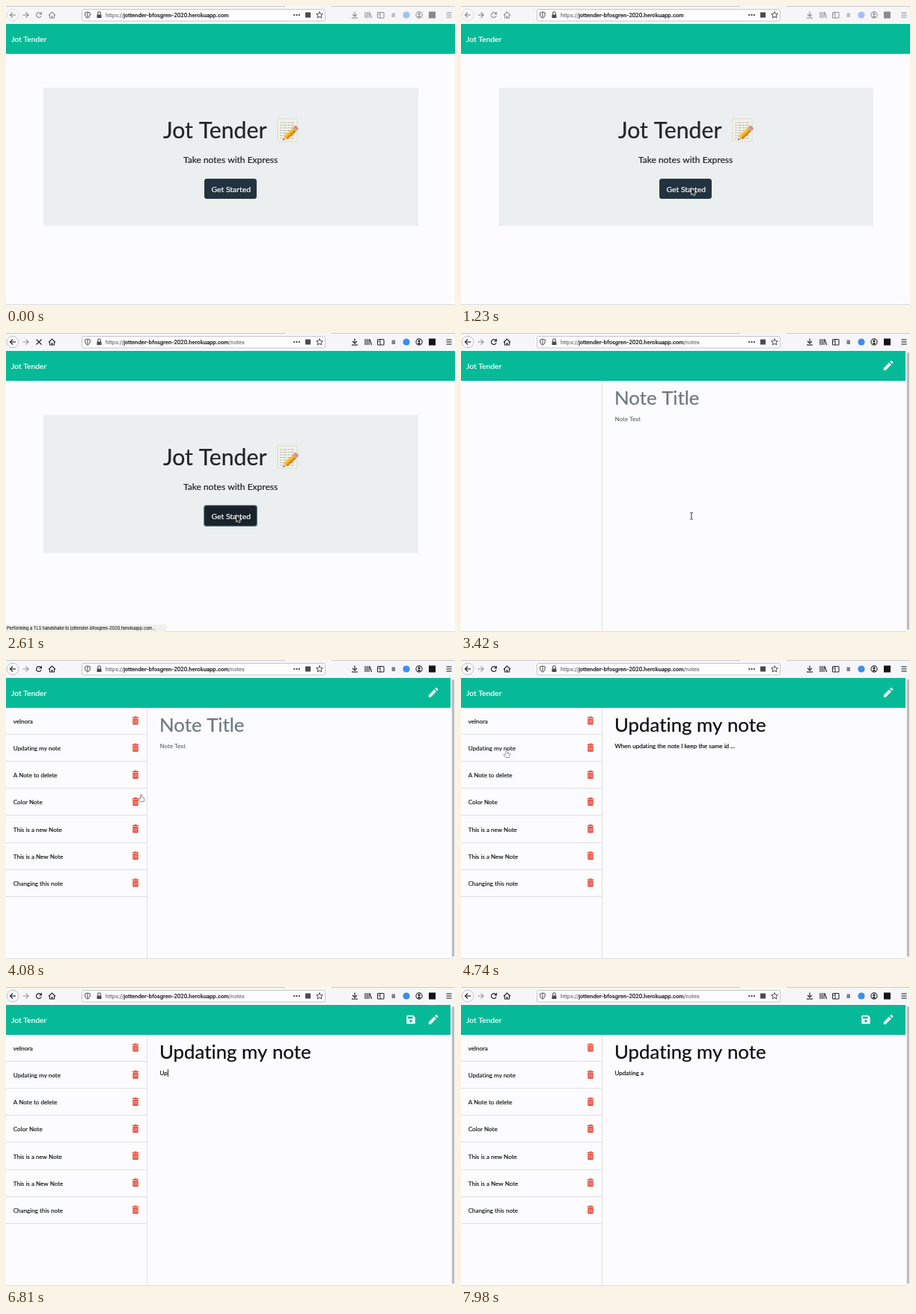
Animation of 600x400 px, one loop 8000 ms. Source, as an HTML page with a canvas:

```html
<!DOCTYPE html>
<html lang="en">
<head>
<meta charset="utf-8">
<title>Notes demo</title>
<style>
html, body { margin: 0; width: 100%; height: 100%; overflow: hidden; background: #fcfcfe; }
canvas { display: block; width: 600px; height: 400px; }
</style>
</head>
<body>
<canvas id="stage" width="600" height="400"></canvas>
<script>
const ctx = document.getElementById('stage').getContext('2d');
const LOOP = 8000;
const T = { active: 2250, click: 2400, status: 2450, notes: 3100, list: 3750,
  open: 4450, drag: 5750, dragEnd: 6200, clear: 6400, type: 6520, rest: 7900 };
const APP = 'Jot Tender';
const HOST = 'jottender-bfosgren-2020.herokuapp.com';
const TITLE = 'Updating my note';
const BODY = 'When updating the note I keep the same id ...';
const TYPED = 'Updating a';
const ITEMS = ['velnora', TITLE, 'A Note to delete', 'Color Note',
  'This is a new Note', 'This is a New Note', 'Changing this note'];
const LATO = 'Lato, sans-serif', UI = 'Inter, Roboto, sans-serif';
const INK = '#2a2a2e', ICON = '#4a4a4f', BODY_INK = '#212529', MUTED = '#6f787f';
const PAGE = '#fcfcfe', RULE = '#dfe0e2', BAR = '#f6f6f8', GREEN = '#06ba98';
const RED = '#e74c3c', SMALL = 8.05;

// Pointer path: time, x, y
const PATH = [[800, 420, 404], [1180, 308, 244], [3800, 308, 244], [4350, 61, 121],
  [5000, 61, 121], [5600, 362, 115], [T.drag, 362, 115], [T.dragEnd, 206, 115]];

function rect(x, y, w, h, color) {
  ctx.fillStyle = color;
  ctx.fillRect(x, y, w, h);
}

function round(x, y, w, h, r, fill, stroke, lw = 1) {
  ctx.beginPath();
  ctx.roundRect(x, y, w, h, r);
  if (fill) { ctx.fillStyle = fill; ctx.fill(); }
  if (stroke) { ctx.strokeStyle = stroke; ctx.lineWidth = lw; ctx.stroke(); }
}

function circle(x, y, r, fill, stroke, lw = 1) {
  ctx.beginPath();
  ctx.arc(x, y, r, 0, Math.PI * 2);
  if (fill) { ctx.fillStyle = fill; ctx.fill(); }
  if (stroke) { ctx.strokeStyle = stroke; ctx.lineWidth = lw; ctx.stroke(); }
}

function line(points, color, lw = 1) {
  ctx.beginPath();
  for (let i = 0; i < points.length; i += 2) ctx.lineTo(points[i], points[i + 1]);
  ctx.strokeStyle = color;
  ctx.lineWidth = lw;
  ctx.stroke();
}

function shape(d, x, y, fill, stroke, lw = 1) {
  const path = new Path2D(d);
  ctx.save();
  ctx.translate(x, y);
  if (stroke) { ctx.strokeStyle = stroke; ctx.lineWidth = lw; ctx.stroke(path); }
  if (fill) { ctx.fillStyle = fill; ctx.fill(path); }
  ctx.restore();
}

// Draws slightly thickened text without ligatures and returns its right edge.
function text(str, x, y, size, color, family = LATO, weight = 400) {
  ctx.font = `${weight} ${size}px ${family}`;
  ctx.letterSpacing = '0.01px';
  ctx.fillStyle = ctx.strokeStyle = color;
  ctx.lineWidth = .22;
  ctx.fillText(str, x, y);
  ctx.strokeText(str, x, y);
  return x + ctx.measureText(str).width;
}

function addressBar(onNotes) {
  round(101.5, 4.5, 325, 15.5, 2, '#fdfdfe', '#c8c8cd');
  shape('M0-4 L3.3-3 V0 Q3 3 0 4.2 Q-3 3-3.3 0 V-3Z', 109, 12, null, ICON);
  line([109, 9, 109, 15], ICON, 1);
  rect(121.5, 11.5, 6, 4.5, ICON);
  shape('M-1.8 0 V-2 A1.8 1.8 0 0 1 1.8-2 V0', 124.5, 11.5, null, ICON, 1.1);
  let x = text('https://', 133, 14.8, 7.1, '#75757b', UI);
  x = text(HOST, x, 14.8, 7.1, '#18181c', UI, 500);
  if (onNotes) text('/notes', x, 14.8, 7.1, '#75757b', UI);
  for (let i = -1; i < 2; i++) circle(388.5 + i * 3.3, 12, 1.1, INK);
  rect(400, 8.5, 7, 7, ICON);
  shape('M0-4.4 L1.3-1.4 4.4-1.2 2 .9 2.8 4 0 2.3 -2.8 4 -2 .9 -4.4-1.2 -1.3-1.4Z',
    419, 12, null, ICON);
}

function navButtons(active, loading) {
  circle(9, 12, 7.8, '#fbfbfc', '#b4b4ba', .8);
  line([13, 12, 5.5, 12], INK, 1.2);
  line([9, 8.5, 5.5, 12, 9, 15.5], INK, 1.2);
  ctx.save();
  if (active) ctx.globalAlpha = .4;
  line([22.5, 12, 30, 12], INK, 1.2);
  line([26.5, 8.5, 30, 12, 26.5, 15.5], INK, 1.2);
  ctx.restore();
  if (loading) {
    line([40.5, 8.5, 47.5, 15.5], INK, 1.3);
    line([47.5, 8.5, 40.5, 15.5], INK, 1.3);
  } else {
    ctx.beginPath();
    ctx.arc(44, 12, 3.4, .4, 5.4);
    ctx.strokeStyle = INK;
    ctx.lineWidth = 1.2;
    ctx.stroke();
    shape('M0-4 V0 H-4Z', 48, 11.5, INK);
  }
  line([57, 12.5, 61.5, 8, 66, 12.5], INK, 1.2);
  line([58.5, 12, 58.5, 16, 64.5, 16, 64.5, 12], INK, 1.1);
  rect(60.7, 13, 1.7, 3, INK);
}

function toolIcons() {
  line([466, 7.5, 466, 14], INK, 1.2);
  line([463, 11, 466, 14, 469, 11], INK, 1.2);
  line([462, 16, 470, 16], INK, 1.2);
  for (const x of [480, 482.5, 485]) line([x, 8, x, 16], INK, 1.2);
  line([486, 8.5, 488.5, 16], INK, 1.2);
  round(496.5, 8.5, 8.5, 7.5, 1, null, INK, 1.1);
  line([500, 8.5, 500, 16], INK);
  line([497.5, 11, 499.5, 11], INK);
  rect(515.5, 9.5, 4.5, 5.5, '#7d8088');
  circle(535, 12, 4.6, '#3b8df0');
  circle(552, 12, 4.1, null, INK, 1.1);
  circle(552, 10.9, 1.6, INK);
  shape('M-2.6 2.6 Q0-.6 2.6 2.6 Q0 4-2.6 2.6Z', 552, 12, INK);
  rect(565, 7.5, 9, 9, '#141416');
  for (const y of [9, 12, 15]) line([588.5, y, 595.5, y], INK, 1.1);
}

function browser(t) {
  const active = t >= T.active;
  rect(0, 0, 600, 24, BAR);
  rect(0, 0, 373, 1, '#c9c9ce');
  rect(435, 0, 165, 1, '#c9c9ce');
  ctx.save();
  ctx.globalAlpha = active ? 1 : .48;
  navButtons(active, t >= T.click && t < T.notes);
  toolIcons();
  ctx.restore();
  addressBar(t >= T.click);
}

function navbar(width) {
  rect(0, 24, width, 40, GREEN);
  text(APP, 7, 48, 10.3, '#f4fffc');
}

function memo(x, y) {
  round(x + 1, y, 26, 30, 1, '#f2f2ea', '#d2d2c8', .7);
  ctx.setLineDash([3, 1, 5, 1]);
  for (let i = 0; i < 7; i++) {
    line([x + 4, y + 5 + i * 3.5, x + 23, y + 5 + i * 3.5], '#a5a5a2', .8);
  }
  ctx.setLineDash([]);
  ctx.save();
  ctx.translate(x + 8, y + 28.5);
  ctx.rotate(-.75);
  ctx.scale(.9, 1);
  shape('M0 0 L6-3.4 V3.4Z', 0, 0, '#e6c48d');
  shape('M0 0 L2-1.1 V1.1Z', 0, 0, '#3c3830');
  rect(6, -3.4, 17, 6.8, '#f5b120');
  rect(6, 1, 17, 2.4, '#d9860f');
  rect(6, -3.4, 17, 1.8, '#fbd04b');
  rect(23, -3.4, 2, 6.8, '#a9aaa8');
  round(25, -3.4, 4, 6.8, 1.5, '#e58b78');
  ctx.restore();
}

function homePage(t) {
  navbar(600);
  rect(50, 109.5, 501, 185, '#ebeff0');
  text(APP, 210, 177, 30.2, BODY_INK);
  memo(362, 151);
  text('Take notes with Express', 237, 210, 12, BODY_INK);
  const pressed = t >= T.click;
  if (pressed) round(264, 230, 72, 29, 3.5, '#74858c');
  round(265.5, 231.5, 69, 26, 2.5, pressed ? '#18232b' : '#22323f', '#1a2832', .8);
  text('Get Started', 274.5, 248.5, 10.4, '#fbfbfc');
  if (t >= T.status) {
    rect(0, 390, 215, 10, '#f0f0ec');
    text('Performing a TLS handshake to ' + HOST + '...', 1, 397.3, 5.6, '#3a3a3e', UI);
  }
}

function pencil() {
  shape('M-6.2 3.4 V6.2 H-3.4 L4-1.2 1.2-4Z M2.2-5 L5-2.2 6.2-3.4 Q6.7-4 6.2-4.6 L4.6-6.2 Q4-6.7 3.4-6.2Z',
    571, 43.5, '#f8fffd');
}

function saveIcon() {
  round(535.3, 38, 11.4, 11.2, 1.3, '#f8fffd');
  shape('M0 0 H3 V3 Z', 544, 37.8, GREEN);
  rect(537, 39.5, 6.5, 2.8, GREEN);
  circle(541, 45.8, 1.8, GREEN);
}

function trash(x, y) {
  rect(x - 4.3, y - 4.6, 8.6, 1.4, RED);
  rect(x - 1.7, y - 5.6, 3.4, 1.2, RED);
  round(x - 3.7, y - 2.6, 7.4, 8.2, 1, RED);
  for (let i = -1; i < 2; i++) line([x + i * 1.9, y - 1, x + i * 1.9, y + 4], '#f6c2ba', .7);
}

function noteList() {
  ITEMS.forEach((name, i) => {
    const y = i * 36.15;
    text(name, 9.7, 85 + y, SMALL, BODY_INK);
    trash(173, 81 + y);
    rect(0, Math.round(99 + y), 188, 1, RULE);
  });
}

function noteText(t) {
  const x = 205.5, y = 117.8;
  if (t < T.open) return text('Note Text', x, y, SMALL, MUTED);
  if (t < T.clear) {
    if (t >= T.drag) {
      const left = pointer(Math.min(t, T.dragEnd))[0];
      rect(left, 109.5, 362 - left, 11, '#b7d6fb');
    }
    return text(BODY, x, y, SMALL, '#15171a');
  }
  const count = Math.max(0, Math.floor((t - T.type) / 150) + 1);
  const end = text(TYPED.slice(0, count), x, y, SMALL, '#15171a');
  if (!count) text('Note Text', x, y, SMALL, MUTED);
  if (t < T.rest) rect(Math.round(end), 110, 1, 10, '#333338');
}

function notesPage(t) {
  navbar(594);
  pencil();
  if (t >= T.type) saveIcon();
  rect(594, 24, 6, 376, '#f5f5f6');
  round(596, 26, 3, 371, 1.5, '#bcbcc0');
  rect(188, 64, 1, 336, RULE);
  if (t >= T.list) noteList();
  ctx.save();
  ctx.beginPath();
  ctx.rect(200, 66, 390, 34);
  ctx.clip();
  const open = t >= T.open;
  text(open ? TITLE : 'Note Title', 205, 96, 25.8, open ? '#0c0d0f' : MUTED);
  ctx.restore();
  noteText(t);
}

function pointer(t) {
  const next = PATH.findIndex(p => p[0] > t);
  if (next < 0) return PATH[PATH.length - 1].slice(1);
  if (next === 0) return PATH[0].slice(1);
  const [t0, x0, y0] = PATH[next - 1], [t1, x1, y1] = PATH[next];
  const u = (t - t0) / (t1 - t0), k = u * u * (3 - 2 * u);
  return [x0 + (x1 - x0) * k, y0 + (y1 - y0) * k];
}

function cursor(t) {
  if (t < PATH[0][0] || t >= T.clear) return;
  const [x, y] = pointer(t);
  if (t < T.notes) {
    shape('M0 0 V8 L1.9 6.3 3.2 9.4 4.6 8.8 3.3 5.8 5.8 5.6Z', x, y, '#1c1c1e', '#f2f2f2', 1.4);
  } else if (x < 188 && t >= T.list) {
    shape('M-.8 0 Q0-1 .8 0 V3.4 L3.6 4 Q4.3 4.2 4.2 5.2 L3.3 9 H-1.2 L-3.6 5.6 Q-3.2 4.4-.8 5.8Z',
      x, y, '#fefefe', INK, 1);
  } else {
    line([x, y - 3, x, y + 4.5], ICON, 1.1);
    line([x - 2, y - 4, x, y - 3, x + 2, y - 4], ICON, 1);
    line([x - 2, y + 5.5, x, y + 4.5, x + 2, y + 5.5], ICON, 1);
  }
}

function frame(now) {
  const t = now % LOOP;
  rect(0, 0, 600, 400, PAGE);
  rect(0, 399, 600, 1, '#dcdce0');
  (t < T.notes ? homePage : notesPage)(t);
  browser(t);
  cursor(t);
}

const start = performance.now();
function tick() {
  frame(performance.now() - start);
  requestAnimationFrame(tick);
}
tick();
</script>
</body>
</html>
```
